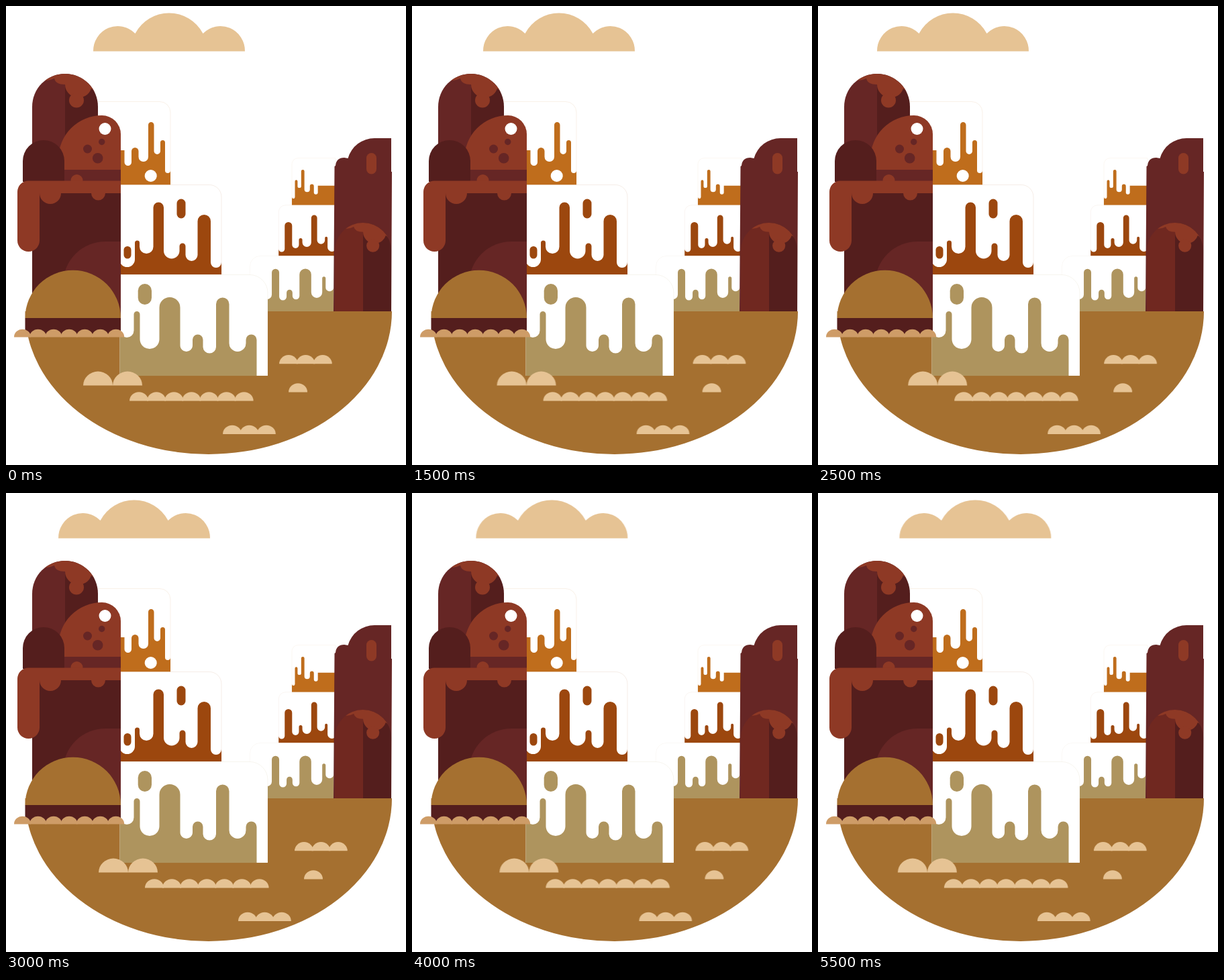
An HTML page for the animation above (6 s loop, 596 by 684 pixels).

```html
<!DOCTYPE html>
<html lang="en">
<head>
<meta charset="utf-8">
<title>Dripping cliffs</title>
<style>
  html, body { margin: 0; width: 100%; height: 100%; overflow: hidden; background: #fff; }
  svg { display: block; width: 596px; height: 684px; }
  .wine { fill: #662625; }
  .dark { fill: #541e1d; }
  .rust { fill: #8e3925; }
  .earth { fill: #a57030; }
  .sand { fill: #e6c394; }
  .white { fill: #fff; }
  .amber { fill: #bf6d1c; stroke: #bf6d1c; }
  .brick { fill: #9c470e; stroke: #9c470e; }
  .khaki { fill: #ae945e; stroke: #ae945e; }
  .drip { stroke: none; }
  .slab { fill: #fff; stroke-width: .5; stroke-opacity: .2; }
  #cloud { animation: drift 6s linear infinite; }
  #waves { animation: sway 6s linear infinite; }
  @keyframes drift {
    0%, 100% { transform: translateX(0); }
    33.333% { transform: translateX(-32px); }
    50% { transform: translateX(-52px); }
  }
  @keyframes sway {
    0%, 100% { transform: translateX(0); }
    50% { transform: translateX(23px); }
  }
</style>
</head>
<body>
<svg viewBox="0 0 596 684">
  <defs>
    <clipPath id="arch"><path d="M-49 170V49A49 49 0 0 1 49 49V170Z"/></clipPath>
    <g id="spire" clip-path="url(#arch)">
      <rect x="-49" width="49" height="170"/>
      <rect class="dark" width="49" height="170"/>
      <path class="rust" d="M-33 10Q-24 11 -16 7Q-14 16 0 16A20 20 0 0 0 39 22Q44 24 48 36L60 -5H-33Z"/>
      <circle class="rust" cx="17" cy="39.500" r="11"/>
    </g>
  </defs>

  <g id="farCake"></g>

  <path class="earth" d="M28.500 455H575A273.250 213 0 0 1 28.500 455Z"/>

  <g id="rightTower">
    <path class="wine" d="M488 455L489.500 239L491 238Q492 226 504 226L509.500 227A41 41 0 0 1 549 197H574V247H575L574 455Z"/>
    <rect class="rust" x="537" y="219" width="15" height="31.500" rx="7.500"/>
    <use href="#spire" fill="#702820" transform="translate(532 323) scale(.865 .776)" style="display:none"/>
    <svg width="596" height="455"><use href="#spire" fill="#702820" transform="translate(532 323) scale(.865)"/></svg>
  </g>

  <g id="nearCake"></g>

  <g id="leftTower">
    <use href="#spire" class="wine" transform="translate(88 101)"/>
    <path class="rust" d="M78 245V228A65 65 0 0 1 143 163A28 28 0 0 1 171 191V245Z"/>
    <circle class="white" cx="147.500" cy="183" r="9"/>
    <g class="wine">
      <circle cx="121.500" cy="213" r="6.500"/>
      <circle cx="142.700" cy="202.500" r="4.700"/>
      <circle cx="136.700" cy="226.800" r="7.800"/>
      <rect x="80" y="244" width="91" height="18"/>
    </g>
    <circle class="rust" cx="105.500" cy="260" r="9"/>
    <path class="dark" d="M25 262V231A31 31 0 0 1 87 231V262Z"/>
    <rect class="dark" x="39" y="270" width="132" height="200"/>
    <path class="wine" d="M85 414A63 63 0 0 1 148 351H171V466H85Z"/>
    <path class="rust" d="M17 277A16.500 16.500 0 0 1 33.500 260.500H171V279H148A10.500 10.500 0 0 1 127 279H82A16 16 0 0 1 50 279V349.500A16.500 16.500 0 0 1 17 349.500Z"/>
    <path class="earth" d="M28.500 465A71.250 71.250 0 0 1 171 465Z"/>
    <rect class="dark" x="28.500" y="465" width="142.500" height="28"/>
    <g id="foam" fill="#ce9c67"></g>
  </g>

  <path id="cloud" class="sand" d="M130 67.500A36.500 37 0 0 1 192.500 41A57 57 0 0 1 293.500 41A36.500 37 0 0 1 356 67.500Z"/>
  <g id="waves" class="sand"></g>
</svg>
<script>
  const put = (id, markup) => { document.getElementById(id).innerHTML += markup; };

  // Wavy top edge: round dips and fingers by turns, as (tip y, right x) pairs.
  function drips(path, base, x, ...edge) {
    for (let i = 0; i < edge.length; i += 2) {
      const tip = edge[i], right = edge[i + 1], r = (right - x) / 2;
      const finger = i / 2 % 2;
      const y = finger ? tip + r : tip - r;
      path += `V${y}A${r} ${r} 0 0 ${finger} ${right} ${y}`;
      x = right;
    }
    return `${path}V${base}Z`;
  }

  // The far cake is the near one, mirrored and smaller, with each tier shifted.
  const SCALE = 0.565;
  function tier(color, left, top, right, base, r, shift, outline) {
    const body = `M${left} ${base}V${top}H${right - r}a${r} ${r} 0 0 1 ${r} ${r}V${base}Z`;
    put('nearCake', `<g id="${color}" class="${color}"><path class="slab" d="${body}"/>` +
      `<path class="drip" d="${outline}"/></g>`);
    put('farCake', `<use href="#${color}" transform="translate(${583.9 + shift} 146.200) scale(${-SCALE} ${SCALE})"/>`);
  }

  const pill = (color, x, y, w, h) => put('nearCake',
    `<rect class="${color} drip" x="${x}" y="${y}" width="${w}" height="${h}" rx="${w / 2}"/>`);

  function humps(id, x, base, count, r, pitch) {
    for (let i = 0; i < count; i++) {
      put(id, `<path d="M${x + i * pitch} ${base}a${r} ${r * 0.95} 0 0 1 ${2 * r} 0Z"/>`);
    }
  }

  tier('amber', 130, 142.5, 245, 266.5, 16, -19.5,
    drips('M130 266.500V215H176.500', 266.5, 176.5, 238, 187, 211, 197.5, 232, 212,
      173, 220.5, 221, 230, 200, 237, 249, 245));
  tier('brick', 160, 266.5, 321, 400, 18, 3.7,
    drips('M169 400', 400, 169, 389, 192, 349.5, 199, 369, 219.5, 292.5, 235,
      376.5, 258.5, 353.5, 267.5, 380, 285.5, 311, 305, 390, 321));
  tier('khaki', 169.5, 400.5, 390, 551, 27, 0,
    drips('M169.500 551', 551, 169.5, 494, 190.5, 455, 199.5, 511, 228.5, 434, 259.5,
      515, 278, 489.5, 293.5, 517.5, 313, 434.5, 332.5, 515, 357.5, 489.5, 373.5));

  pill('white', 206.7, 244, 18, 18);
  pill('brick', 175.5, 358, 11, 18.5);
  pill('brick', 254.5, 287.5, 13, 29);
  pill('khaki', 196.7, 414, 20.3, 31);

  humps('foam', 12, 493.5, 7, 12.5, 23.2);
  humps('waves', 115, 565.5, 2, 22, 44);
  humps('waves', 184, 588.5, 7, 14, 26.1);
  humps('waves', 407, 533.3, 3, 14, 25.4);
  humps('waves', 421, 575.5, 1, 14, 0);
  humps('waves', 323, 638, 3, 14, 25.4);
</script>
</body>
</html>
```
